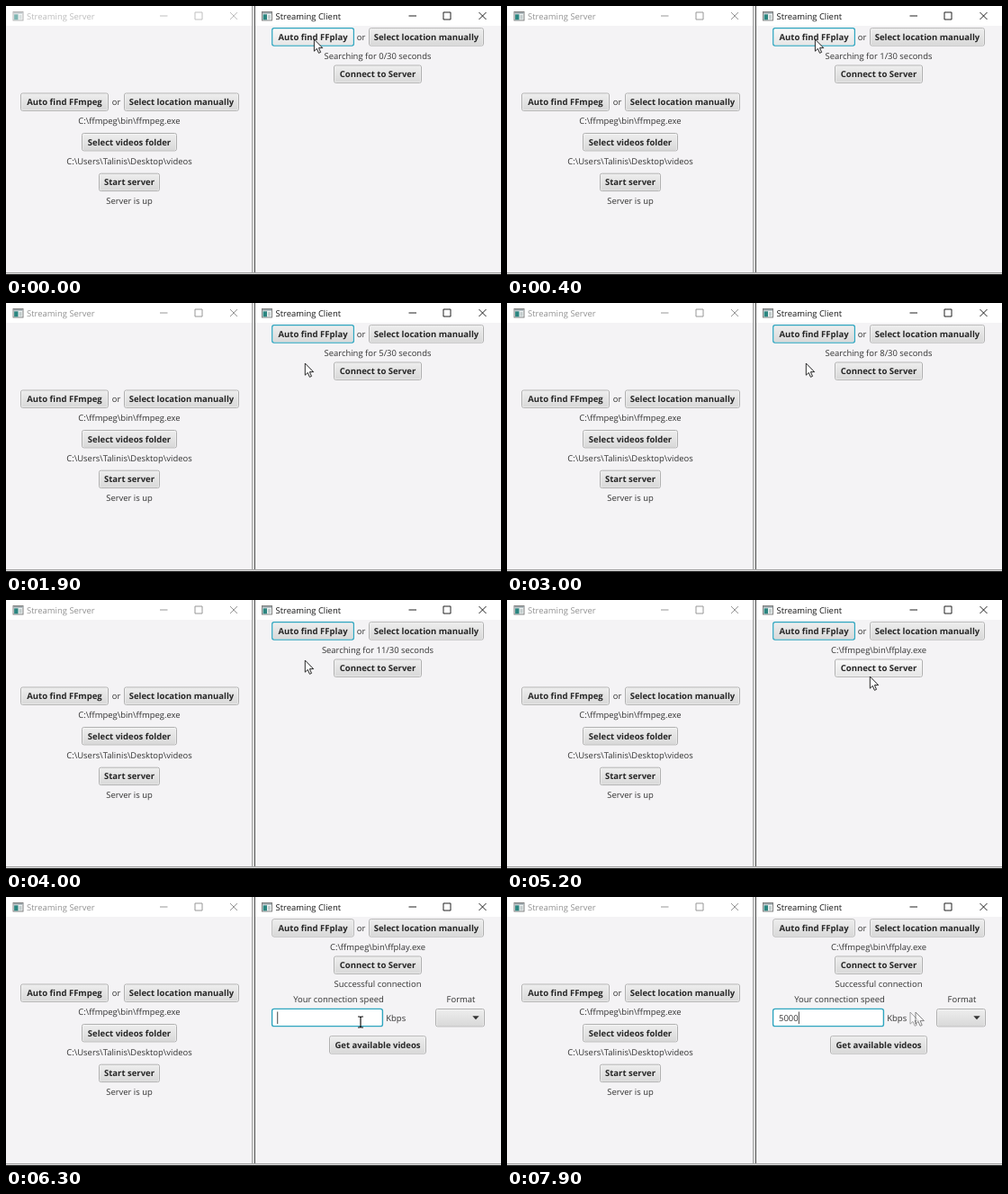
An HTML page for the animation above (8 s loop, 550 by 299 pixels).

```html
<!DOCTYPE html>
<html lang="en">
<head>
<meta charset="utf-8">
<title>Streaming windows</title>
<style>
html, body { margin: 0; width: 100%; height: 100%; overflow: hidden; background: #f4f3f5; }
svg { display: block; width: 100vw; height: 100vh; }
text { font: 9.45px "Open Sans", "Noto Sans", sans-serif; fill: #333; white-space: pre; text-rendering: geometricPrecision; }
.bold { font-size: 9.52px; font-weight: 700; fill: #262626; }
.mid { text-anchor: middle; }
</style>
</head>
<body>
<svg id="stage" viewBox="0 0 550 299">
  <defs>
    <linearGradient id="face" x2="0" y2="1">
      <stop stop-color="#ededed"/><stop offset="1" stop-color="#d9d9d9"/>
    </linearGradient>
    <linearGradient id="hover" x2="0" y2="1">
      <stop stop-color="#f8f8f8"/><stop offset="1" stop-color="#e6e6e6"/>
    </linearGradient>
  </defs>
</svg>
<script>
const LOOP = 8000, STEP = 100;
const RIM = "#b0b0b0", RING = "#2ea5bf";
const stage = document.getElementById("stage");

function add(tag, attrs, parent = stage) {
  const el = document.createElementNS("http://www.w3.org/2000/svg", tag);
  set(el, attrs);
  parent.appendChild(el);
  return el;
}
function set(el, attrs) {
  for (const k in attrs) el.setAttribute(k, attrs[k]);
}
const group = parent => add("g", {}, parent);
const box = (x, y, width, height, fill, parent, more) =>
  add("rect", { x, y, width, height, fill, ...more }, parent);
const show = (el, on) => set(el, { visibility: on ? "inherit" : "hidden" });
const place = (el, x, y) => set(el, { transform: `translate(${x} ${y})` });
const outline = (el, focused) =>
  set(el, { stroke: focused ? RING : RIM, "stroke-width": focused ? 1.4 : 1 });

// Text whose middle line is at y
function label(str, x, y, cls = "mid", parent = stage) {
  const el = add("text", { x, y: y + 3.5, class: cls }, parent);
  el.textContent = str;
  return el;
}

function button(str, x, y, w, parent = stage) {
  const g = group(parent);
  const rim = box(x + 0.5, y + 0.5, w - 1, 19.4, "#fafafa", g, { rx: 2 });
  const face = box(x + 1.4, y + 1.4, w - 2.8, 17.6, "url(#face)", g, { rx: 1.3 });
  label(str, x + w / 2, y + 10.2, "mid bold", g);
  const update = (focused, hovered) => {
    outline(rim, focused);
    set(face, { fill: `url(#${hovered ? "hover" : "face"})` });
  };
  update(false, false);
  return update;
}

function titleBar(str, x, w, color, [min, max, close]) {
  box(x, 0, w, 22, "#fff");
  const g = group();
  box(x + 7.5, 6.5, 11, 9.5, "#eef3f3", g, { stroke: "#777", "stroke-width": 0.9 });
  box(x + 8, 7, 10, 1.6, "#9aa6ab", g);
  box(x + 8.6, 9.3, 4.4, 6, "#2b8580", g);
  box(x + 14, 10, 3, 4.6, "#c3cdcd", g);
  label(str, x + 22.6, 11.5, "", g).style.fill = color;
  add("path", {
    d: `M${min} 11h8.5M${max} 7h8v8h-8zM${close} 7l8 8m0-8l-8 8`,
    fill: "none", stroke: color, "stroke-width": 0.95
  }, g);
  return g;
}

// Server window
box(0, 0, 273, 296, "#f4f3f5");
const serverBar = titleBar("Streaming Server", 0.5, 273, "#929292", [171, 210, 249]);
button("Auto find FFmpeg", 16, 96.5, 98);
label("or", 122.5, 106.5);
button("Select location manually", 131, 96.5, 128);
label("C:\\ffmpeg\\bin\\ffmpeg.exe", 137, 127.5);
button("Select videos folder", 84, 141, 106);
label("C:\\Users\\Talinis\\Desktop\\videos", 137, 172);
button("Start server", 103, 185.7, 68);
label("Server is up", 137, 216.3);

// Client window
box(273, 0, 4, 299, "#dcdcdc");
box(273, 0, 1, 297, "#a5a5a5");
box(277, 0, 273, 296, "#f4f3f5");
titleBar("Streaming Client", 277, 273, "#161616", [447.5, 486, 525.5]);
box(276, 0, 1, 297, "#555");
box(0, 296, 550, 1, "#a5a5a5");
box(0, 297, 550, 1, "#dedede");
box(0, 298, 550, 1, "#222");

const find = button("Auto find FFplay", 295.3, 24.2, 91.5);
label("or", 394.5, 34.5);
button("Select location manually", 403, 24.2, 128);
const status = label("", 413, 55);
const connect = button("Connect to Server", 364, 65.5, 98);

// Panel shown after connecting
const panel = group();
label("Successful connection", 413, 96.3, "mid", panel);
label("Your connection speed", 369.5, 113.3, "mid", panel);
label("Format", 505.5, 113.3, "mid", panel);
const field = box(295.6, 124.4, 122.8, 19.2, "#fff", panel, { rx: 2.2 });
const typed = label("", 302, 134, "", panel);
const caret = box(301, 127.5, 0.9, 13.5, "#333", panel);
label("Kbps", 422.3, 134, "", panel);
button("", 477, 124, 55, panel);
add("path", { d: "M518.3 132.3h7.4l-3.7 4z", fill: "#333" }, panel);
button("Get available videos", 359, 154.2, 108, panel);

// Pointers
const arrowShape = {
  d: "M0 0V13.2L3 10.4 5.1 15.3 7.2 14.4 5.1 9.6H9.4Z",
  fill: "#fff", stroke: "#111", "stroke-width": 0.9, "stroke-linejoin": "round"
};
const ghost = add("path", { ...arrowShape, opacity: 0.4 });
const arrow = add("path", arrowShape);
const beam = add("path", {
  d: "M-3-6h2.2L0-5.2.8-6H3M0-5.5V5.5M-3 6h2.2L0 5.2.8 6H3",
  fill: "none", stroke: "#111", "stroke-width": 1.2
});

// time, x, y
const route = [
  [0, 342.4, 37], [900, 342.4, 37], [1500, 332.3, 67], [4700, 332.3, 67],
  [5200, 403.3, 85], [5400, 403.3, 81], [5600, 403.3, 81], [6200, 408, 136],
  [6300, 394, 139], [7300, 394, 139], [7700, 441, 128], [7900, 454, 128]
];
function pointerAt(t) {
  const i = route.findIndex(p => p[0] > t);
  if (i < 0) return route[route.length - 1].slice(1);
  const [t0, x0, y0] = route[i - 1], [t1, x1, y1] = route[i];
  const u = (t - t0) / (t1 - t0), k = u * u * (3 - 2 * u);
  return [x0 + (x1 - x0) * k, y0 + (y1 - y0) * k];
}

const FOUND = 4700, CLICK = 5500, OPEN = 5700, FOCUS = 6200, BLUR = 7900;
const keyTimes = [6700, 6900, 7100, 7300];

function draw(ms) {
  const t = Math.floor(ms / STEP) * STEP;
  const [x, y] = pointerAt(t);
  const seconds = Math.max(0, 1 + Math.floor((t - 390) / 361));
  const over = (left, top, w) => x > left && x < left + w && y > top && y < top + 20;

  set(serverBar, { opacity: t < STEP ? 0.6 : 1 });
  status.textContent = t < FOUND ? `Searching for ${seconds}/30 seconds` : "C:\\ffmpeg\\bin\\ffplay.exe";
  find(t < CLICK, over(295, 24, 91));
  connect(t >= CLICK && t < FOCUS, over(364, 65.5, 98));

  show(panel, t >= OPEN);
  outline(field, t >= FOCUS);
  const count = keyTimes.filter(k => t >= k).length;
  typed.textContent = "5000".slice(0, count);
  set(caret, { x: count ? 302.2 + count * 5.41 : 301.3 });
  show(caret, t > FOCUS && (t < 6500 || count > 0));

  const inField = t >= OPEN && x > 295 && x < 419 && y > 124 && y < 144;
  show(beam, inField);
  show(arrow, !inField);
  show(ghost, t >= BLUR);
  set(arrow, { opacity: t >= BLUR ? 0.55 : 1 });
  place(beam, x, y);
  place(arrow, x, y);
  place(ghost, x - 6, y);
}

const start = performance.now();
function tick(now) {
  draw(Math.max(0, now - start) % LOOP);
  requestAnimationFrame(tick);
}
draw(0);
requestAnimationFrame(tick);
</script>
</body>
</html>
```
